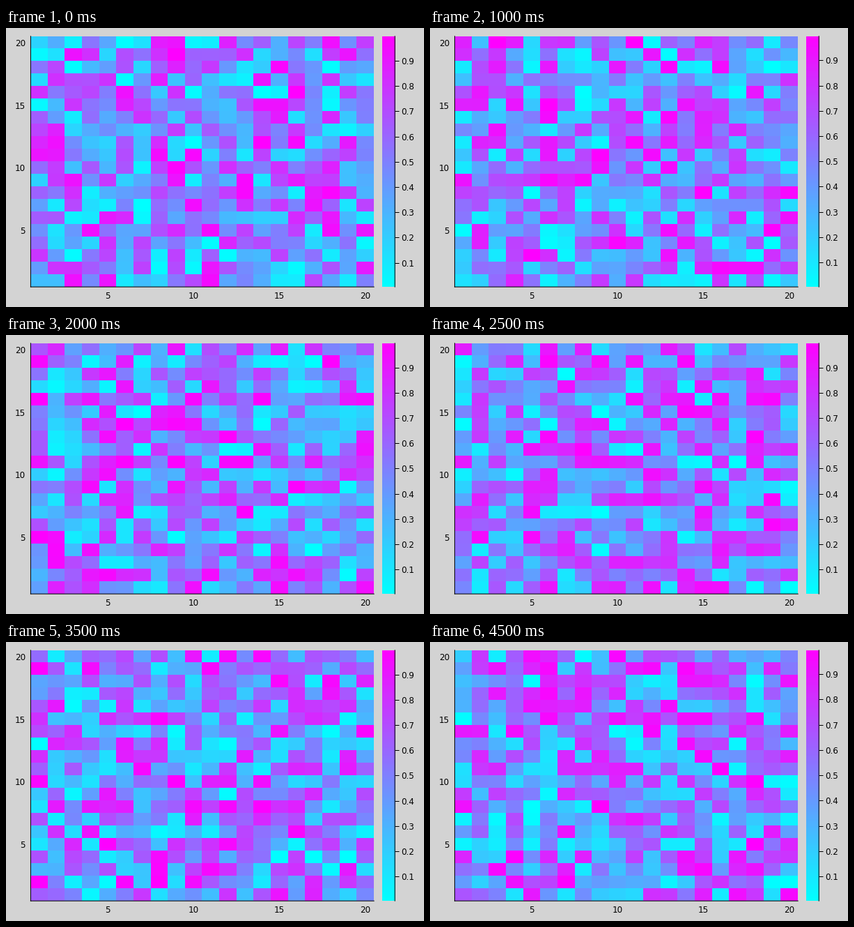
These frames come from a looping animation (600x400 px, 5 s). A matplotlib script:

```python
import numpy as np
import matplotlib.pyplot as plt
from matplotlib.animation import FuncAnimation

W, H, DPI = 600, 400, 100
N, FRAMES, STEP = 20, 10, 500
PX = 72 / DPI  # one pixel in points
TOP, BOTTOM = 11.81, 371.2

plt.rcParams["font.family"] = "DejaVu Sans"
fig = plt.figure(figsize=(W / DPI, H / DPI), dpi=DPI, facecolor="#d3d3d3")


def add_axes(left, right, spines):
    """Axes between two pixel columns, showing only the named spines."""
    ax = fig.add_axes([left / W, 1 - BOTTOM / H, (right - left) / W, (BOTTOM - TOP) / H])
    for name, spine in ax.spines.items():
        spine.set_visible(name in spines)
        spine.set_linewidth(PX)
        spine.set_snap(False)
    return ax


def random_grid(i):
    """Uniform noise for one step, with its value range."""
    rng = np.random.default_rng(700 + i)
    grid = rng.random((N, N))
    lo, hi = rng.uniform(0.002, 0.0045), rng.uniform(0.994, 0.997)
    grid = (grid - grid.min()) / (grid.max() - grid.min())
    return lo + grid * (hi - lo), lo, hi


ax = add_axes(35.43, 528.2, ("left", "bottom"))
heat = ax.imshow(np.zeros((N, N)), cmap="cool", vmin=0, vmax=1, origin="lower",
                 aspect="auto", interpolation="nearest",
                 extent=(0.5, N + 0.5, 0.5, N + 0.5))
ax.set_xticks([5, 10, 15, 20])
ax.set_yticks([5, 10, 15, 20])
ax.tick_params(length=0, labelsize=12 * PX)
ax.tick_params(axis="x", pad=7 * PX)
ax.tick_params(axis="y", pad=7.5 * PX)

cax = add_axes(540, 558.2, ("right",))
bar = cax.imshow(np.linspace(0, 1, 360)[:, None], cmap="cool", origin="lower",
                 aspect="auto", interpolation="nearest", extent=(0, 1, 0, 1))
cax.set_xticks([])
cax.yaxis.tick_right()
cax.set_yticks(np.arange(1, 10) / 10)
cax.tick_params(axis="y", length=6 * PX, width=PX, pad=3 * PX, labelsize=12 * PX)


def draw(i):
    grid, lo, hi = random_grid(i)
    heat.set_data(grid)
    heat.set_clim(lo, hi)
    bar.set_extent((0, 1, lo, hi))
    cax.set_ylim(lo, hi)
    return heat, bar


anim = FuncAnimation(fig, draw, frames=FRAMES, interval=STEP,
                     repeat=True, repeat_delay=0, blit=False)
plt.show()
```
